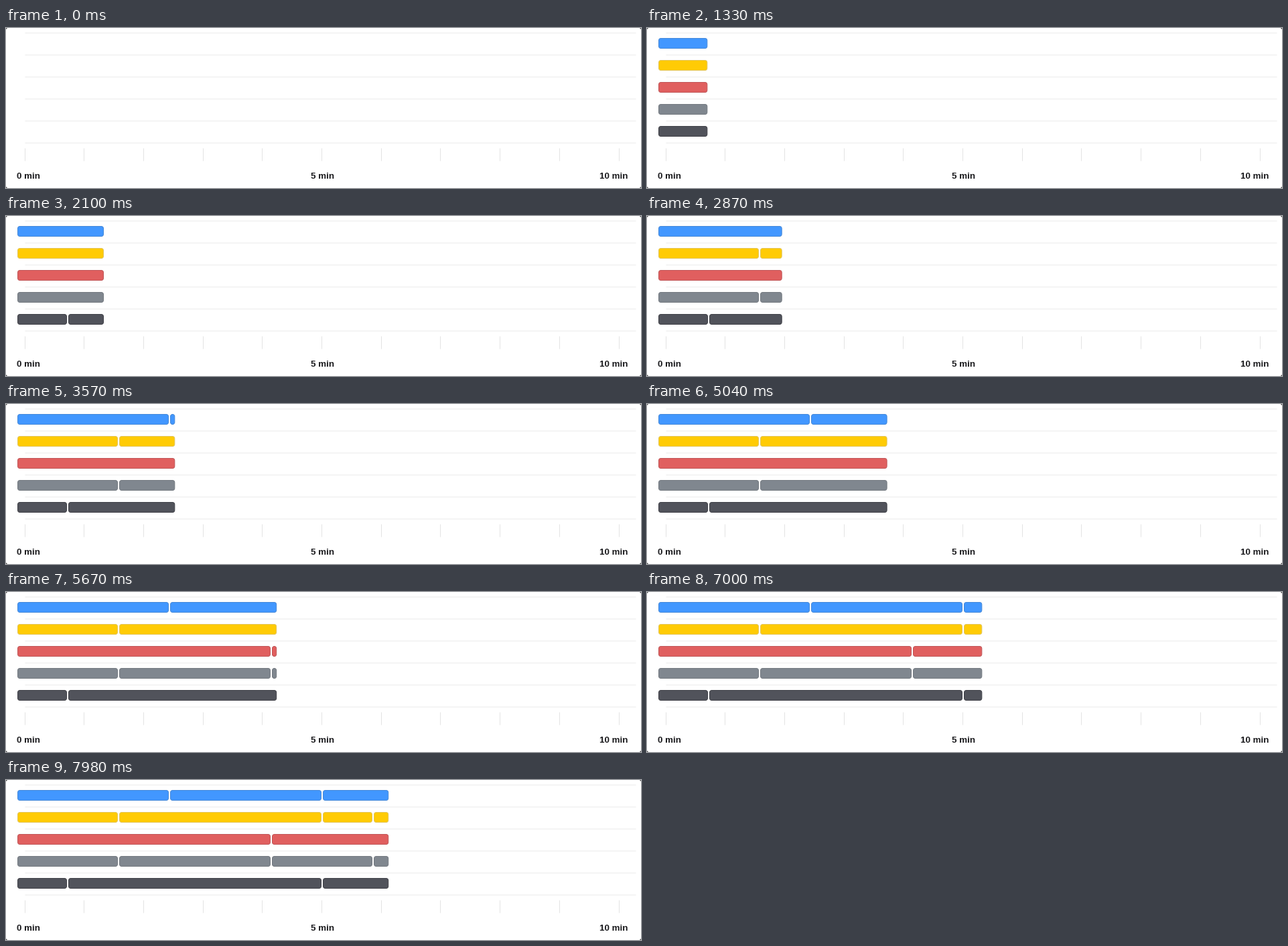
These frames come from a looping animation (948x240 px, 8 s). A matplotlib script:

```python
import matplotlib.pyplot as plt
from matplotlib.animation import FuncAnimation
from matplotlib.patches import FancyBboxPatch

W, H, DPI = 948, 240, 100
PX = 72 / DPI  # points per pixel
LOOP_MS, INTERVAL = 8000, 20
START_MS, STEP_MS = 350, 70

LEFT, CELL, SPEED = 16, 76, 5.062
ROW_TOP, ROW_GAP, BAR_H = 15, 33, 16

# fill, border, cells at which a new segment begins
ROWS = [
    ("#4297ff", "#4689d8", [0, 3, 6]),
    ("#ffcb05", "#e2c55c", [0, 2, 6, 7]),
    ("#e05f5f", "#c05759", [0, 5]),
    ("#80878f", "#747a81", [0, 2, 5, 7]),
    ("#51535b", "#404148", [0, 1, 6]),
]

fig = plt.figure(figsize=(W / DPI, H / DPI), dpi=DPI, facecolor="#303030")
ax = fig.add_axes([0, 0, 1, 1])
ax.set(xlim=(0, W), ylim=(H, 0))
ax.axis("off")


def rounded(x, y, w, h, radius, **style):
    box = FancyBboxPatch((x, y), w, h, boxstyle=f"round,pad=0,rounding_size={radius}", **style)
    return ax.add_patch(box)


rounded(0, 0, W, H, 3, fc="white", ec="none", zorder=0)

ax.hlines([6.5 + ROW_GAP * i for i in range(6)], 28, 940,
          color="#ebebeb", lw=PX, zorder=1)
ax.vlines([int(28 + 88.7 * i) + 0.5 for i in range(11)], 180, 199,
          color="#e3e3e3", lw=PX, zorder=1)
for x, label in [(33.7, "0 min"), (472.3, "5 min"), (907.2, "10 min")]:
    ax.text(x, 226, label, ha="center", va="baseline", color="#1a1a1d",
            family="Liberation Sans", weight="bold", size=13.4 * PX)

segments = []
for row, (fill, border, cuts) in enumerate(ROWS):
    for first, last in zip(cuts, cuts[1:] + [99]):
        patch = rounded(0, ROW_TOP + ROW_GAP * row + 0.5, 1, BAR_H - 1, 0,
                        fc=fill, ec=border, lw=PX, zorder=2, visible=False)
        segments.append((patch, LEFT + CELL * first + 1, LEFT + CELL * last - 1))


def update(frame):
    time = frame * INTERVAL + INTERVAL / 2
    step = int((time - START_MS) // STEP_MS) + 1 if time >= START_MS else 0
    head = LEFT - 1.6 + SPEED * step
    for patch, begin, end in segments:
        width = min(head, end) - begin
        patch.set_visible(step > 0 and width > 1)
        if patch.get_visible():
            patch.set_x(begin + 0.5)
            patch.set_width(width - 1)
            patch.set_boxstyle("round", pad=0, rounding_size=min(3.5, (width - 1) / 2))
    return [patch for patch, *_ in segments]


anim = FuncAnimation(fig, update, frames=LOOP_MS // INTERVAL, interval=INTERVAL,
                     repeat=True, repeat_delay=0, blit=False)
plt.show()
```
